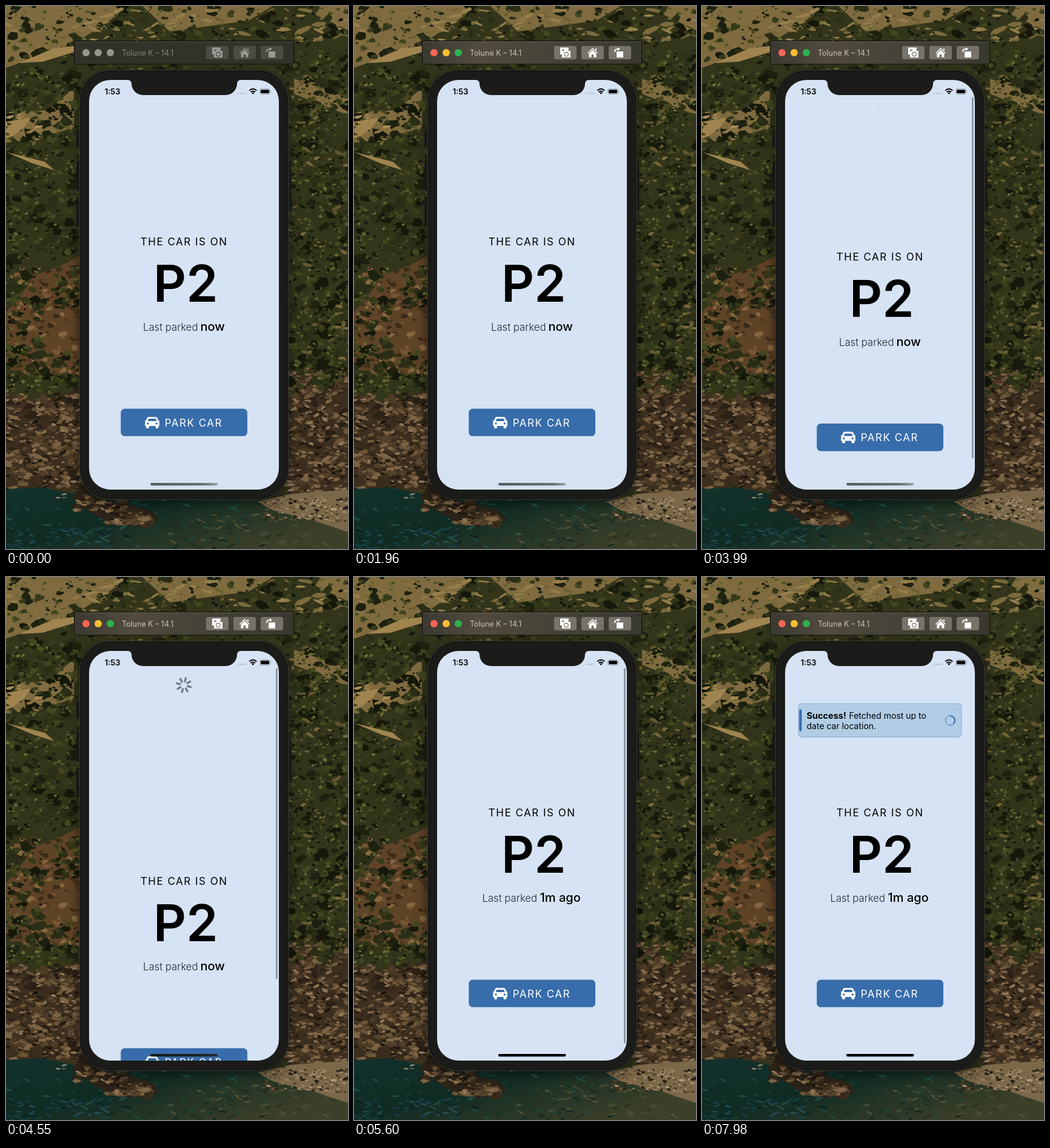
An HTML page for the animation above (8 s loop, 564 by 896 pixels).

```html
<!DOCTYPE html>
<html lang="en">
<head>
<meta charset="utf-8">
<title>Parking app pull to refresh</title>
<style>
html, body { margin: 0; width: 100%; height: 100%; overflow: hidden; background: #2b2c18; }
svg { display: block; width: 100vw; height: 100vh; font-family: Inter, sans-serif; }
.caps { font-size: 17px; letter-spacing: 1.5px; }
</style>
</head>
<body>
<svg viewBox="0 0 564 896">
  <defs>
    <linearGradient id="sea" x2="1" y2=".6">
      <stop offset="0" stop-color="#12322d"/><stop offset=".45" stop-color="#102b23"/><stop offset="1" stop-color="#3d4029"/>
    </linearGradient>
    <linearGradient id="barOn"><stop stop-color="#3b3930"/><stop offset=".25" stop-color="#514b3e"/><stop offset="1" stop-color="#39382f"/></linearGradient>
    <linearGradient id="pill"><stop stop-color="#4f5b5a"/><stop offset=".8" stop-color="#66736f"/><stop offset="1" stop-color="#98a6a8"/></linearGradient>
    <clipPath id="stage"><rect width="564" height="896"/></clipPath>
    <clipPath id="screen"><rect x="137" y="122" width="313" height="676" rx="35"/></clipPath>
    <filter id="soft"><feGaussianBlur stdDeviation=".6"/></filter>
    <filter id="shade" x="-20%" y="-10%" width="140%" height="120%"><feGaussianBlur stdDeviation="8"/></filter>
  </defs>

  <g clip-path="url(#stage)">
    <rect width="564" height="896" fill="#33351b"/>
    <g id="scene" filter="url(#soft)"></g>
    <rect x="119" y="110" width="349" height="710" rx="50" opacity=".5" filter="url(#shade)"/>
  </g>

  <g id="bar">
    <rect id="barBox" x="112.5" y="57.5" width="362" height="38.5" rx="3" stroke="#0c0c09"/>
    <path d="M114 59H473" stroke="#77736a" stroke-width=".7" opacity=".6"/>
    <g id="lights"><circle cx="132" cy="77" r="6"/><circle cx="152" cy="77" r="6"/><circle cx="172" cy="77" r="6"/></g>
    <text id="device" x="191" y="81.7" font-size="12.5">Tolune K – 14.1</text>
    <g id="keys">
      <rect x="330" y="66" width="37" height="22" rx="3"/><rect x="375" y="66" width="37" height="22" rx="3"/><rect x="420" y="66" width="37" height="22" rx="3"/>
    </g>
    <g id="icons">
      <path d="M340 68.500H354V72H343V80H340ZM343 74H346L347.500 72H352.500L354 74H357V85H343Z"/>
      <circle id="lens" cx="350" cy="79.500" r="3.300" fill="none" stroke-width="1.200"/>
      <path d="M385 77.500L393.500 69 402 77.500 401 78.500 393.500 71 386 78.500ZM387.500 78.500L393.500 72.500 399.500 78.500V84.500H395.300V80H391.700V84.500H387.500ZM398 70H400V74L398 72Z"/>
      <path d="M433 75H444V85H433ZM429 76Q429 70 435 70V68L439 71 435 74V72Q431 72 431 76Z"/>
    </g>
  </g>

  <g fill="#181816">
    <path d="M122 206H118Q116 206 116 208V231Q116 233 118 233H122ZM122 256H118Q116 256 116 258V304Q116 306 118 306H122ZM122 315H118Q116 315 116 317V362Q116 364 118 364H122ZM465 256H468Q470 256 470 258V337Q470 339 468 339H465Z"/>
    <rect x="121.500" y="105.500" width="344.500" height="709" rx="50" fill="#1b1c1a" stroke="#3b3c36"/>
    <rect x="123" y="107" width="341.500" height="706" rx="48.500" fill="none" stroke="#0f100f"/>
  </g>

  <g clip-path="url(#screen)">
    <rect x="137" y="122" width="313" height="676" fill="#d6e3f4"/>
    <g id="spinner" stroke="#717d87" stroke-width="3.400" stroke-linecap="round"></g>
    <g id="content">
      <text class="caps" x="293.700" y="395" text-anchor="middle">THE CAR IS ON</text>
      <text x="243" y="488" font-size="84" font-weight="600">P2</text>
      <text id="last" y="536" font-size="16.700" font-weight="300" fill="#222a35">Last parked</text>
      <text id="ago" y="536" font-size="20" font-weight="500"></text>
      <rect x="189.300" y="664.500" width="208.700" height="45.300" rx="6.500" fill="#386dab"/>
      <text class="caps" x="261.700" y="693.500" fill="#fff">PARK CAR</text>
      <path fill="#fff" fill-rule="evenodd" d="M235 678H247Q249 678 250 680.500L251.300 684H253V686H252.200Q253 687 253 688.500V693H251.500V695Q251.500 697 249.500 697H248.500Q246.500 697 246.500 695V693H236V695Q236 697 234 697H233Q231 697 231 695V693H229.300V688.500Q229.300 687 230.200 686H229.200V684H231L232.300 680.500Q233 678 235 678ZM236 681Q235.200 681 235 681.700L233.800 685H248.500L247.300 681.700Q247 681 246.300 681ZM234 687.200A1.700 1.700 0 1 0 234 690.600A1.700 1.700 0 1 0 234 687.200ZM248.300 687.200A1.700 1.700 0 1 0 248.300 690.600A1.700 1.700 0 1 0 248.300 687.200Z"/>
    </g>
    <g id="toast">
      <rect x="159" y="209" width="269" height="55" rx="5" fill="#b1cce5" stroke="#9db9d9" stroke-width="1.400"/>
      <rect x="160.300" y="218.500" width="4.200" height="36" rx="2" fill="#386dab"/>
      <text font-size="14"><tspan x="172.500" y="233.500" font-size="14.500" font-weight="700">Success!</tspan><tspan x="242.500" y="233.500">Fetched most up to</tspan><tspan x="172.500" y="251">date car location.</tspan></text>
      <g fill="none" stroke="#386dab">
        <circle cx="409.500" cy="236.700" r="8" stroke-width=".9"/>
        <circle id="ring" cx="409.500" cy="236.700" r="7.400" stroke-width="2" pathLength="1" transform="rotate(-90 409.500 236.700)"/>
      </g>
    </g>
    <rect id="scroll" x="445" y="150.500" width="2.600" rx="1.300" fill="#84919d"/>
    <g>
      <text x="162.700" y="145.700" font-size="13" font-weight="600">1:53</text>
      <path d="M383.500 144H397" stroke="#a9b4c2" stroke-width="2.400" stroke-linecap="round" stroke-dasharray="0 3.800"/>
      <path d="M401.300 139.500Q407.300 134.200 413.300 139.500M403.600 142Q407.300 138.800 411 142" fill="none" stroke="#000" stroke-width="1.900"/>
      <path d="M405 143.300Q407.300 141.500 409.600 143.300L407.300 145.800Z"/>
      <rect x="418.500" y="136.900" width="17" height="8.400" rx="2.600" fill="none" stroke="#788391" stroke-width=".9"/>
      <rect x="420" y="138.300" width="14" height="5.600" rx="1.400"/>
      <path d="M436.700 139.700Q438.300 141.100 436.700 142.500Z" fill="#788391"/>
    </g>
    <rect x="238" y="787" width="111.500" height="4.200" rx="2.100" fill="url(#pill)"/>
    <rect id="home" x="238" y="787" width="111.500" height="4.200" rx="2.100"/>
  </g>
  <path fill="#1b1c1a" d="M201 121V122A6 6 0 0 1 207 128A19 19 0 0 0 226 147H362A19 19 0 0 0 381 128A6 6 0 0 1 387 122V121Z"/>
</svg>

<script>
const LOOP = 8000, FOCUS = 1890, PULL = 3780, RELEASE = 4600, FETCHED = 4800;
const TOAST = 5750, COUNTDOWN = 6290;
const $ = id => document.getElementById(id);
const clamp = v => Math.min(1, Math.max(0, v));
const ramp = (t, a, b) => clamp((t - a) / (b - a));
const smooth = v => v * v * (3 - 2 * v);

function add(parent, tag, attrs) {
  const node = document.createElementNS(parent.namespaceURI, tag);
  for (const key in attrs) node.setAttribute(key, attrs[key]);
  parent.append(node);
}
function set(id, attrs) {
  for (const key in attrs) $(id).setAttribute(key, attrs[key]);
}

let seed = 41;
const rand = (a, b) => {
  seed = (seed * 16807) % 2147483647;
  return a + (b - a) * seed / 2147483647;
};
const scene = $('scene');
const shape = (d, fill) => add(scene, 'path', { d, fill });

// Scatters rough flat patches over a box [x0, y0, x1, y1].
function scatter(n, [x0, y0, x1, y1], size, flat, colors) {
  const paths = colors.map(() => '');
  for (let i = 0; i < n; i++) {
    const x = rand(x0, x1), y = rand(y0, y1), r = rand(size * .4, size);
    const tilt = rand(-.6, .6);
    let d = '';
    for (let k = 0; k < 7; k++) {
      const a = k * Math.PI * 2 / 7, q = r * rand(.5, 1.25);
      const px = q * Math.cos(a), py = q * flat * Math.sin(a);
      d += (k ? 'L' : 'M') + (x + px - py * tilt).toFixed(1) + ' ' + (y + py + px * tilt).toFixed(1);
    }
    paths[i % colors.length] += d + 'Z';
  }
  paths.forEach((d, i) => shape(d, colors[i]));
}

// Shadowed crowns first, then leaves, sunlit tips and gaps.
function woods(n, box) {
  scatter(n, box, 15, .65, ['#1d210f', '#2a2e16', '#15180a']);
  scatter(n * 2, box, 8, .7, ['#363a1b', '#43461f', '#2b2f15']);
  scatter(n * 3, box, 4, .7, ['#585a2a', '#4a4c24', '#6b6a35', '#343818']);
  scatter(n * 2, box, 4.5, .6, ['#12150a', '#1b1f0e']);
}
function rocks(n, box) {
  scatter(n, box, 15, .6, ['#2b2116', '#4c3a26', '#3a2c1c']);
  scatter(n * 2, box, 9, .45, ['#6d5538', '#54412b', '#7d6444']);
  scatter(n * 2, box, 6, .4, ['#1a140d', '#93795a', '#261d13', '#5f4a31']);
}

function drawScene() {
  shape('M0 0H205L150 38 112 62 0 102ZM225 0H440L400 24 270 42ZM0 175L70 172 112 135V200L40 224 0 225ZM520 0H564V40L510 14ZM475 120L564 150V180L475 145Z', '#7f6b3f');
  scatter(90, [0, 0, 564, 75], 10, .25, ['#97804d', '#6a5d34', '#857141']);
  woods(55, [0, 0, 564, 112]);
  woods(70, [-5, 105, 122, 420]);
  woods(115, [464, 95, 570, 610]);
  scatter(30, [0, 0, 564, 56], 15, .25, ['#967e4b', '#7d6a3d']);
  scatter(35, [464, 110, 564, 590], 8, .4, ['#66592f', '#79683a']);
  shape('M0 191L42 184 30 200 12 214 0 219ZM0 241L64 257 80 271 45 260ZM22 94L78 70 112 66V76L60 92Z', '#a08450');
  scatter(18, [-5, 175, 60, 220], 9, .35, ['#8d7343', '#383a1c', '#a98c58']);

  shape('M122 412L88 430 45 445 22 480 0 505V600L122 610Z', '#5f4327');
  scatter(110, [5, 430, 122, 610], 8, .6, ['#765431', '#4a341e', '#87673f', '#3a2a18']);
  woods(24, [-5, 430, 60, 640]);
  woods(8, [80, 430, 125, 500]);
  woods(9, [40, 570, 125, 640]);

  shape('M0 640L60 655 124 630V800H0ZM464 600L564 610V830H464Z', '#3d2f1f');
  rocks(85, [0, 640, 125, 798]);
  rocks(85, [464, 595, 564, 805]);
  woods(10, [464, 585, 564, 640]);

  shape('M0 797L60 794 115 806 160 815 350 812 480 815 564 806V896H0Z', 'url(#sea)');
  scatter(120, [0, 812, 430, 896], 9, .2, ['#1a453c', '#0a1f1c', '#1f4d43', '#0f2d28']);
  scatter(60, [0, 862, 170, 896], 9, .2, ['#245059', '#163d45', '#0f2c30']);
  scatter(60, [270, 835, 564, 896], 11, .25, ['#444a31', '#2b3826', '#545236', '#202d20']);
  shape('M415 818L470 805 564 798V868L510 850 440 832Z', '#7b6849');
  scatter(150, [425, 812, 564, 850], 5, .5, ['#96805f', '#4d3e2a', '#b09a78', '#695539', '#292116']);
  scatter(26, [0, 795, 564, 815], 7, .25, ['#8c8670', '#5f5c4c', '#2a261c']);
  shape('M108 812L125 790 160 815 235 831 252 850 205 860 165 850 135 832Z', '#2c2318');
  rocks(12, [115, 808, 200, 834]);
  rocks(10, [168, 836, 240, 856]);
}

function drawSpinner() {
  for (let i = 0; i < 8; i++)
    add($('spinner'), 'path', { d: 'M0 -6.500V-11.800', transform: `rotate(${i * 45})` });
}

function pullOffset(t) {
  if (t < RELEASE) return 113 * smooth(ramp(t, PULL, 4480));
  const u = 12.7 * (t - RELEASE) / 1000;
  return 113 * (1 + u) * Math.exp(-u);
}

function drawBar(on) {
  const lit = ['#fb6557', '#fbbd33', '#2eb150'];
  const key = on ? '#77736a' : '#4b4a43';
  [...$('lights').children].forEach((c, i) => c.setAttribute('fill', on ? lit[i] : '#96958f'));
  set('barBox', { fill: on ? 'url(#barOn)' : '#32312a' });
  set('device', { fill: on ? '#c9c4b9' : '#85847d' });
  set('keys', { fill: key });
  set('icons', { fill: on ? '#fff' : '#9b9a94' });
  set('lens', { stroke: key });
}

function draw(t) {
  drawBar(t >= FOCUS);
  const y = pullOffset(t);
  set('content', { transform: `translate(0 ${y.toFixed(2)})` });

  const fetched = t >= FETCHED;
  $('ago').textContent = fetched ? '1m ago' : 'now';
  set('last', { x: fetched ? 211.5 : 226 });
  set('ago', { x: fetched ? 306.5 : 320.5 });

  const gone = ramp(t, RELEASE, 4900);
  const turn = t < 4400 ? 0 : Math.floor((t - 4400) / 125) * 45 + 15;
  set('spinner', { transform: `translate(293.300 178.500) rotate(${turn}) scale(${1 - gone})`, opacity: 1 - gone });
  [...$('spinner').children].forEach((p, i) => p.setAttribute('opacity', clamp((y - 24) / 9 - i)));

  set('scroll', {
    height: 619 - y * .94,
    opacity: ramp(t, PULL, PULL + 100) * (1 - ramp(t, 6150, 6500))
  });
  set('home', { opacity: ramp(t, 4060, 4760) });

  const shown = smooth(ramp(t, TOAST, TOAST + 350));
  set('toast', { opacity: shown, transform: `translate(0 ${-24 * (1 - shown)})` });
  const done = clamp((t - COUNTDOWN) / 4300);
  set('ring', { 'stroke-dasharray': `${done} 2`, opacity: done > 0 ? 1 : 0 });
}

drawScene();
drawSpinner();
const start = performance.now();
function tick() {
  draw((performance.now() - start) % LOOP);
  requestAnimationFrame(tick);
}
tick();
</script>
</body>
</html>
```
